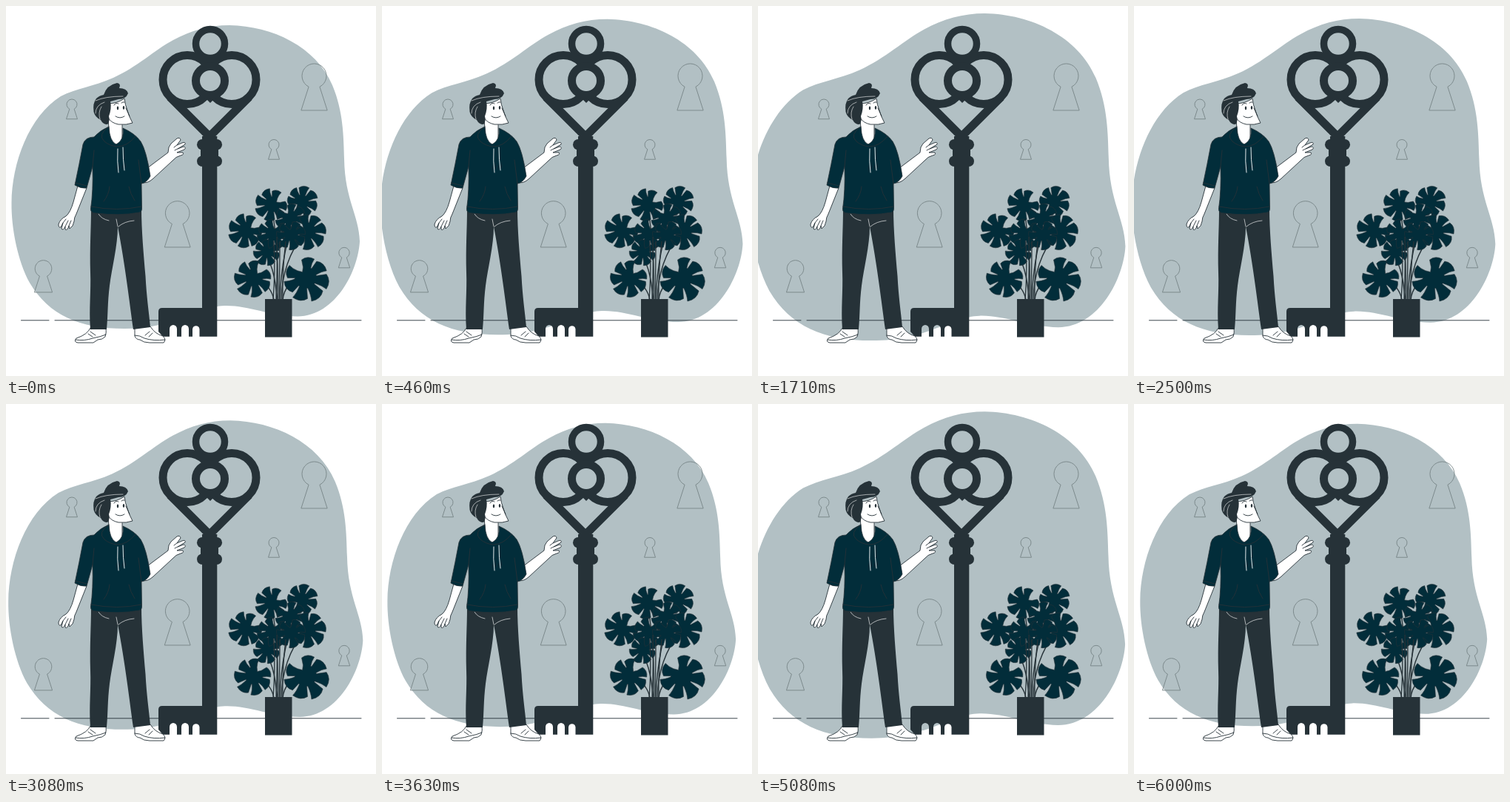
Write an HTML page that moves like this. It is 500 by 500 pixels and loops after 6.04 s.

```html
<!DOCTYPE html>
<html lang="en">
<head>
<meta charset="utf-8">
<title>Man with a key</title>
<style>
  html, body { margin: 0; width: 100%; height: 100%; overflow: hidden; background: #fff; }
  svg { display: block; width: 100%; height: 100%; }
  .ink { fill: #263238; }
  .ring { fill: none; stroke: #263238; }
  .skin { fill: #fff; stroke: #263238; stroke-width: .9; stroke-linejoin: round; }
  .cloth { fill: #022d3a; stroke: #263238; stroke-width: .8; stroke-linejoin: round; }
  .thin { fill: none; stroke: #263238; stroke-width: .9; stroke-linecap: round; stroke-linejoin: round; }
  .pale { fill: none; stroke: #fff; stroke-width: .9; stroke-linecap: round; }
  #holes { fill: none; stroke: #768486; stroke-width: .9; }
  #leaves { fill: #022d3a; stroke: #263238; stroke-width: .6; stroke-linejoin: round; }
</style>
</head>
<body>
<svg viewBox="0 0 500 500">
  <path id="blob" fill="#b2c0c4" d="M302 26C360 27 419 55 441 107C456 143 456 176 457 207C458 262 477 283 478 318C476 357 446 419 394 419.500
    C357 419 326 404 295 405C259 406 230 436 160 436C100 436 58 418 32 374C16 345 7 300 7.500 266C8 212 31 149 74 122
    C95 111 118 109 145 97C178 82 200 60 226 46C250 33 274 26 302 26Z"/>
  <g id="holes"></g>
  <path class="thin" d="M20.500 424.800H58M66 424.800H480"/>

  <g id="key">
    <circle class="ring" cx="276" cy="51" r="19.500" stroke-width="9.500"/>
    <circle class="ring" cx="245" cy="99.500" r="33" stroke-width="11"/>
    <circle class="ring" cx="305" cy="99.500" r="33" stroke-width="11"/>
    <path class="ring" stroke-width="11" d="M221.500 123L275 176.500L328.500 123"/>
    <path class="ink" d="M269 71h14v10h-14zM268 123h16l-8 8z"/>
    <circle cx="276" cy="101" r="19.500" fill="#b2c0c4" stroke="#263238" stroke-width="11"/>
    <path class="ink" d="M265 176H285.300V446.700H261.500V436.500A4.900 5.500 0 0 0 252 436.500V446.700H247V436.500A4.900 5.500 0 0 0 237 436.500V446.700H231V436.500A4.900 5.500 0 0 0 221 436.500V446.700H212L206 440V413Q206 408 211 408H265Z"/>
    <rect class="ink" x="258" y="180" width="34" height="14.500" rx="7.200"/>
    <rect class="ink" x="258" y="202.500" width="34" height="14.500" rx="7.200"/>
    <rect class="ink" x="263" y="192" width="24" height="12"/>
  </g>

  <g id="plant">
    <path class="ring" stroke-width="1.400" d="M366 397Q364 350 345 327M367 397Q369 330 360 278M370 397Q372 330 395 272M372 397Q373 345 403 307M362 397Q359 380 340 367M374 397Q376 375 402 362"/>
    <g id="leaves"></g>
    <path class="ring" stroke-width="1.300" d="M361 397Q364 360 362 318M365 397Q367 350 366 312M369 397Q370 350 370 318M374 397Q373 360 378 318"/>
    <rect class="ink" x="350" y="396" width="36.500" height="51.500"/>
  </g>

  <g id="man">
    <path class="skin" d="M97 243L91 265Q87 279 81 284Q73 288 71 295Q71 300 74 299L77 293L75 301Q77 304 80 298L80 302Q83 304 85 297L86 301Q91 298 92 291Q92 286 95 281L109 246Z"/>
    <path class="thin" d="M77 293L81 288M80 298L84 290M85 297L88 290"/>
    <path class="skin" d="M182 238Q190 241 198 234L224 210Q230 203 236 202Q241 201 239 198L231 198L241 194Q244 191 240 190L232 193L242 187Q243 183 238 185L231 188L236 181Q235 177 231 179L223 186Q219 190 219 198L191 219Z"/>
    <path class="thin" d="M231 188L227 191M232 193L228 195"/>

    <path class="skin" d="M114 435L135 435Q136 441 134 447Q130 451 124 451L118 455H97Q91 454 95 449Q110 444 114 435Z"/>
    <path class="thin" d="M94 451Q106 453 117 449Q128 447 135 444M114 440L121 445M111 443L117 447"/>
    <path class="skin" d="M174 435L195 433Q201 443 212 446Q217 451 213 455H194Q186 455 181 451Q176 451 174 446Z"/>
    <path class="thin" d="M174 445Q181 445 187 449Q199 453 215 451M194 440L188 445M198 442L193 447"/>
    <path class="ink" d="M115 274H183C183 302 186 336 188.500 365C190 394 193 412 195 434L172 437C167 401 161 350 151 298C151 324 143 354 140 378C137 402 138 416 136 437H114C112 409 115 386 114 360C113 326 115 302 115 274Z"/>
    <path class="pale" stroke-opacity=".7" d="M151 298L149 288M152 298Q160 291 173 290M125 281Q129 288 139 290"/>

    <path class="skin" d="M138 150L140 184Q149 192 157 181L157 157Z"/>
    <path class="cloth" d="M119 177Q107 177 104 187Q99 214 93 242Q101 247 109 246L117 217Q118 250 114.500 274Q114 280 122 280Q153 284 180 279Q184 278 183.500 272L183 240Q190 239 195 230Q190 196 182 183Q174 172 158 165Q160 181 149 187Q140 183 139 163Q127 168 119 177Z"/>
    <path class="thin" d="M139 163Q123 174 133 183Q140 189 150 190Q164 190 175 176M117 217L119 195M183 240L179 208M115 271Q150 278 183 271M140 244Q139 255 132 264M166 244Q168 254 174 263M94 239L109 243"/>
    <path class="pale" d="M151 193Q150 210 152 225M158 191Q158 208 160 222"/>

    <path class="skin" d="M137 132Q150 132 160 125Q161 134 164 141Q166 149 171 158Q163 161 152 160Q142 158 138 151Z"/>
    <path class="ink" d="M141 129Q143 138 139 149Q141 156 137 160Q131 160 128 154Q120 150 118.500 143Q117 131 122 125Q126 121 132 120Q136 107 150 104Q156 105 153 111Q163 111 165 118Q162 126 152 126Z"/>
    <path class="pale" stroke-opacity=".65" d="M121 128Q134 122 158 122M121 145Q121 134 133 130M127 153Q124 144 129 136"/>
    <ellipse class="ink" cx="151" cy="138" rx="1.200" ry="2.400"/>
    <ellipse class="ink" cx="159" cy="137.500" rx="1.200" ry="2.400"/>
    <path class="thin" d="M146 134Q148 130 152 132M156 131Q158 129 160 130M148 149Q154 153 160 149M162 138L167 149"/>
  </g>
</svg>
<script>
const byId = id => document.getElementById(id);

const keyhole = (x, y, r) =>
  `<path d="M${x - r * .45} ${y + r * .89}A${r} ${r} 0 1 1 ${x + r * .45} ${y + r * .89}` +
  `L${x + r * 1.07} ${y + r * 2.82}H${x - r * 1.07}Z"/>`;

byId('holes').innerHTML = [
  [416.500, 94.500, 16.500], [89, 133, 7], [362, 187.500, 7],
  [231.700, 280, 16.300], [50.500, 355, 11.300], [457, 333.500, 7.200]
].map(h => keyhole(...h)).join('');

// Monstera leaf: claw-shaped lobes split by narrow slots; `turn` is the tip's direction in degrees.
function leaf(x, y, size, turn) {
  const at = (r, deg) => {
    const a = (deg + turn) * Math.PI / 180;
    return `${(x + size * r * Math.cos(a)).toFixed(1)} ${(y + size * r * Math.sin(a)).toFixed(1)} `;
  };
  let d = 'M' + at(.3, 180);
  for (let i = 0; i < 7; i++) {
    const a = -164 + i * 47;
    const reach = 1 + .1 * Math.cos((a + 23) * Math.PI / 180);
    d += 'L' + at(.5, a) + 'L' + at(reach * .92, a + 1) +
      'Q' + at(reach * 1.13, a + 18) + at(reach * 1.03, a + 39) +
      'Q' + at(reach * .8, a + 36) + at(.5, a + 42);
  }
  return `<path d="${d}Z"/>`;
}

byId('leaves').innerHTML = [
  [360, 268, 21, 150], [399, 265, 20, -30], [384, 286, 20, 60], [325, 303, 22, 150],
  [361, 307, 20, 110], [353, 332, 17, 120], [407, 304, 23, 40], [385, 308, 19, 80],
  [335, 367, 24, 130], [405, 367, 29, 60]
].map(l => leaf(...l)).join('');

const LOOP = 6040, LEAD = 40, STEP = LOOP / 5;
const CENTER = [242.500, 231], GROWTH = .106;

// Grow for one step, shrink over two, then grow and shrink in one each.
function swell(time) {
  const s = ((time + LEAD) % LOOP) / STEP;
  if (s < 1) return s;
  if (s < 3) return (3 - s) / 2;
  return s < 4 ? s - 3 : 5 - s;
}

function draw(time) {
  const scale = (1 + GROWTH * swell(time)) / (1 + GROWTH * swell(0));
  const [x, y] = CENTER;
  byId('blob').setAttribute('transform', `translate(${x} ${y}) scale(${scale}) translate(${-x} ${-y})`);
}

const start = performance.now();
function tick() {
  draw(performance.now() - start);
  requestAnimationFrame(tick);
}
tick();
</script>
</body>
</html>
```
